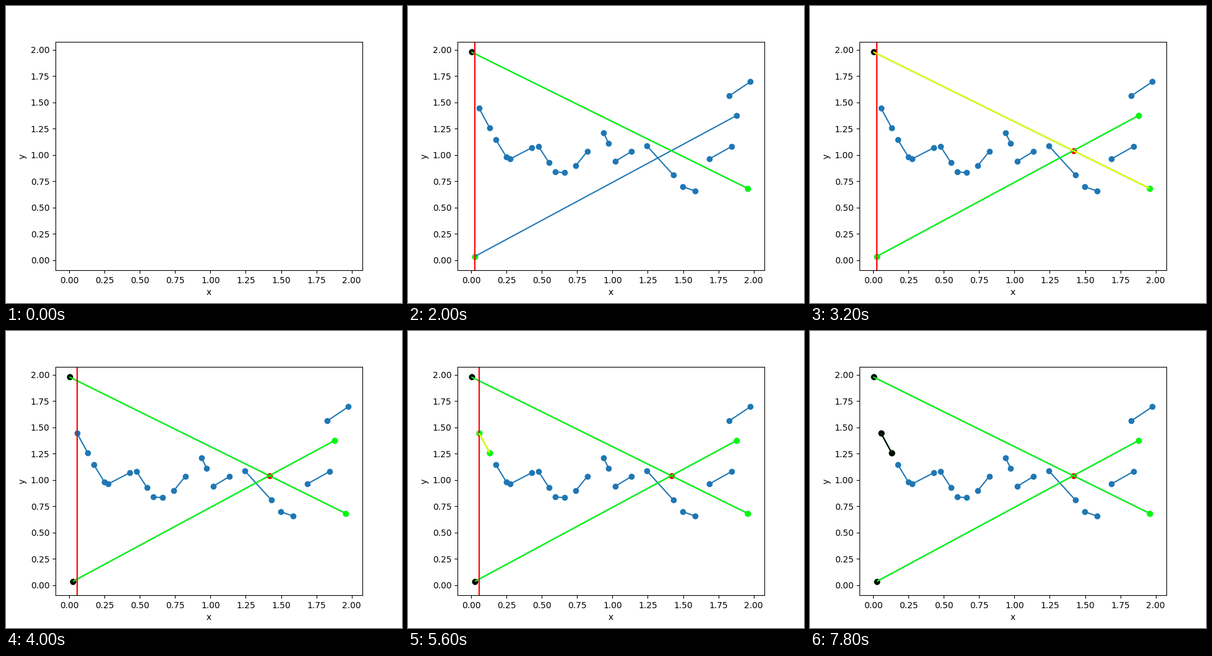
Write a matplotlib script that moves like this. It is 640x480 px and loops after 8 s.

```python
import matplotlib.pyplot as plt
import numpy as np
from matplotlib.animation import FuncAnimation
from matplotlib.collections import LineCollection

FRAMES, INTERVAL = 40, 200
BLUE, LIME = "tab:blue", "lime"

# The three segments visited by the sweep.
UPPER = (0.002, 1.978), (1.958, 0.681)
LOWER = (0.027, 0.035), (1.879, 1.374)
MIDDLE = (0.056, 1.443), (0.132, 1.255)
# Short segments on the right, and the knots of the broken curve before them.
VALLEY = (1.498, 0.697), (1.585, 0.656)
RISE = (1.687, 0.962), (1.844, 1.080)
PEAK = (1.826, 1.560), (1.977, 1.696)
KNOTS = [(0.175, 1.144), (0.277, 0.962), (0.477, 1.080), (0.595, 0.838),
         (0.740, 0.896), (0.937, 1.209), (1.020, 0.939), (1.245, 1.084)]


def catmull_rom(a, b, c, d, t):
    return b + t / 2 * (c - a + t * (2 * a - 5 * b + 4 * c - d
                                     + t * (3 * (b - c) + d - a)))


def dashes(knots):
    """Dash from each inner knot part of the way along the smooth curve."""
    knots = np.array(knots)
    for k, quad in enumerate(zip(knots, knots[1:], knots[2:], knots[3:])):
        yield quad[1], catmull_rom(*quad, 0.6 + 0.2 * np.cos(0.74 * k))


segments = [UPPER, LOWER, MIDDLE, VALLEY, RISE, PEAK,
            *dashes([MIDDLE[0], *KNOTS, *VALLEY])]


def padded(lo, hi, margin=0.05):
    pad = (hi - lo) * margin
    return lo - pad, hi + pad


fig, ax = plt.subplots(figsize=(6.4, 4.8), dpi=100)
ax.set(xlabel="x", ylabel="y",
       xlim=padded(UPPER[0][0], PEAK[1][0]),
       ylim=padded(0.001, UPPER[0][1]))
ax.autoscale(False)

timeline = []  # [artist, first step, step at which it is gone]
step = 0


def show(artist):
    """Reveal an artist at the next step and return its slot."""
    global step
    step += 1
    timeline.append([artist, step, FRAMES])
    return len(timeline) - 1


def hide(slot):
    global step
    step += 1
    timeline[slot][2] = step


def add_dots(points, color):
    return show(ax.scatter(*zip(*points), color=color))


def add_lines(segs, color):
    return show(ax.add_collection(LineCollection(segs, colors=color),
                                  autolim=False))


def paint(seg, color):
    add_dots(seg[:1], color)
    add_lines([seg], color)
    add_dots(seg[1:], color)


def crossing(s, t):
    (x1, y1), (x2, y2) = s
    (x3, y3), (x4, y4) = t
    m, n = (y2 - y1) / (x2 - x1), (y4 - y3) / (x4 - x3)
    x = (y3 - y1 + m * x1 - n * x3) / (m - n)
    inside = max(x1, x3) <= x <= min(x2, x4)
    return (x, y1 + m * (x - x1)) if inside else None


def compare(s, t):
    marks = [add_lines([seg], "yellow") for seg in (s, t)]
    point = crossing(s, t)
    if point:
        add_dots([point], "red")
    for mark in marks:
        hide(mark)


def visit(seg, end, neighbours=()):
    """Handle the sweep reaching one endpoint of a segment."""
    sweep = show(ax.axvline(seg[end][0], color="red"))
    paint(seg, "black" if end else LIME)
    for other in neighbours:
        compare(seg, other)
    hide(sweep)
    add_dots([seg[end]], "black")


add_lines(segments, BLUE)
add_dots([p for seg in segments for p in seg], BLUE)
visit(UPPER, 0)
visit(LOWER, 0, [UPPER])
visit(MIDDLE, 0, [LOWER, UPPER])
visit(MIDDLE, 1)


def update(frame):
    for artist, start, end in timeline:
        artist.set_visible(start <= frame < end)
    return [entry[0] for entry in timeline]


anim = FuncAnimation(fig, update, frames=FRAMES, interval=INTERVAL,
                     init_func=lambda: update(0), repeat=True,
                     repeat_delay=0, blit=False)
plt.show()
```
